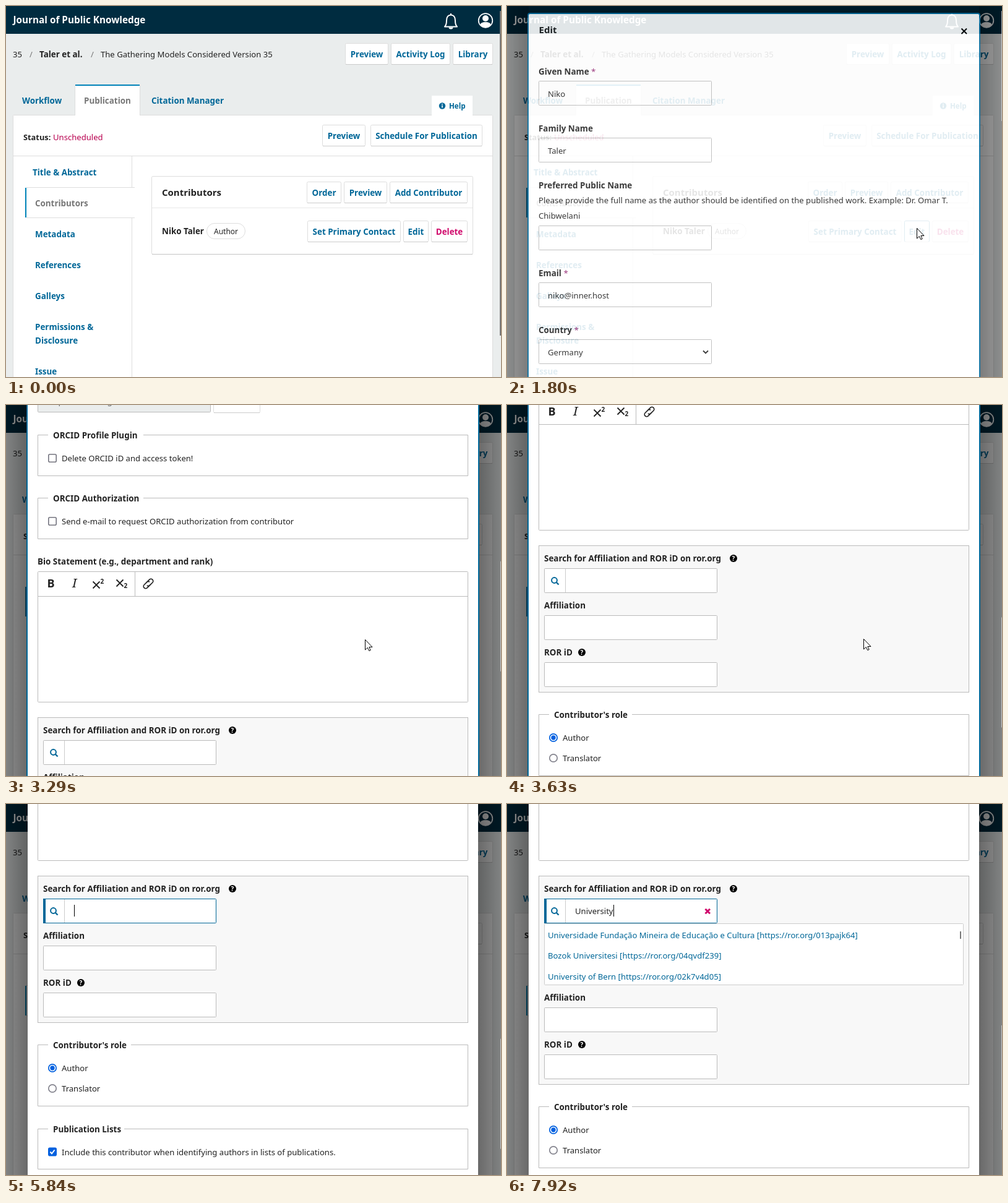
An HTML page for the animation above (8 s loop, 800 px wide and 600 px high).

```html
<!DOCTYPE html>
<html lang="en">
<head>
<meta charset="utf-8">
<title>Contributor form</title>
<style>
  html, body { margin: 0; width: 100%; height: 100%; overflow: hidden; background: #eaeded; }
  svg { display: block; width: 800px; height: 600px; }
  text { font: 13.1px "Noto Sans", sans-serif; fill: #222; white-space: pre; }
  .b { font-weight: 700; font-size: 13.4px; }
  .h { font-weight: 700; font-size: 15px; }
  .s { font-size: 12px; }
  .link { fill: #006798; }
  .mute { fill: #777; }
  .red { fill: #d00a6c; }
  .white { fill: #fff; }
  .mid { text-anchor: middle; }
  .code { font-size: 13.8px; fill: #6a6a6a; }
</style>
</head>
<body>
<svg id="stage" viewBox="0 0 800 600"></svg>
<script>
const BLUE = '#006798', LINE = '#ddd', FIELD = '#bbb';
const stage = document.getElementById('stage');

// ---- drawing helpers (text is placed by its vertical centre) ----
const text = (x, cy, str, cls = '') =>
  `<text x="${x}" y="${cy + 5}" class="${cls}">${str.replace(/&/g, '&amp;')}</text>`;
const box = (x, y, w, h, fill = '#fff', stroke = FIELD, rx = 1, extra = '') =>
  `<rect x="${x + .5}" y="${y + .5}" width="${w - 1}" height="${h - 1}" rx="${rx}" fill="${fill}" stroke="${stroke}" ${extra}/>`;
const fill = (x, y, w, h, color, extra = '') =>
  `<rect x="${x}" y="${y}" width="${w}" height="${h}" fill="${color}" ${extra}/>`;
const path = (d, stroke, width = 1, extra = '') =>
  `<path d="${d}" fill="none" stroke="${stroke}" stroke-width="${width}" ${extra}/>`;
const group = (id, content) => `<g id="${id}">${content}</g>`;

const button = (x, y, w, h, label, cls = 'link', id = '') =>
  box(x, y, w, h, '#fff', LINE, 2, id && `id="${id}"`) +
  path(`M${x + 1} ${y + h - .5}h${w - 2}`, '#ccc') +
  text(x + w / 2, y + h / 2, label, `b mid ${cls}`);

const label = (x, cy, str, required) =>
  `<text x="${x}" y="${cy + 5}" class="b">${str}${required ? '<tspan font-weight="400" fill="#91216f"> *</tspan>' : ''}</text>`;
const input = (x, y, value = '') => box(x, y, 280, 40) + text(x + 15, y + 21, value);
const field = (cy, name, required, value) => label(51, cy, name, required) + input(51, cy + 15, value);
const fieldset = (top, bottom, gapEnd, legend) =>
  path(`M68 ${top + .5}H51.5V${bottom + .5}H746.5V${top + .5}H${gapEnd}`, FIELD) + text(76, top + 1, legend, 'b');
const help = (x, cy) =>
  `<circle cx="${x}" cy="${cy}" r="6" fill="#000"/><text x="${x}" y="${cy + 3.6}" class="mid white" style="font-size:10px;font-weight:700">?</text>`;
const checkbox = (cy, str, checked) =>
  `<rect x="68.8" y="${cy - 6.2}" width="12.4" height="12.4" rx="2" fill="${checked ? '#0060df' : '#fff'}" stroke="${checked ? '#0060df' : '#74747f'}" stroke-width="1.6"/>` +
  (checked ? path(`M71.5 ${cy}l2.5 3 4.5-6`, '#fff', 2) : '') + text(90, cy, str);
const radio = (cy, str, checked) =>
  `<circle cx="75" cy="${cy}" r="6.2" fill="#fff" stroke="${checked ? '#0060df' : '#85858f'}" stroke-width="1.7"/>` +
  (checked ? `<circle cx="75" cy="${cy}" r="3.7" fill="#0060df"/>` : '') + text(90, cy, str);

// ---- page behind the dialog ----
const menu = [['Metadata', 369], ['References', 419], ['Galleys', 469], ['Permissions &', 519], ['Disclosure', 541], ['Issue', 591]];
const page =
  fill(0, 0, 800, 600, '#eaeded') + fill(0, 0, 800, 45, '#002c40') +
  '<text x="11.5" y="28" class="b white" style="font-size:15.3px">Journal of Public Knowledge</text>' +
  path('M709 33.5c3-3 3-6 3-10c0-6 3-9 7-9s7 3 7 9c0 4 0 7 3 10zM719 14.5v-2.5', '#fff', 2, 'stroke-linejoin="round"') +
  '<path d="M715.5 34.5a3.5 3 0 0 0 7 0z" fill="#fff"/>' +
  '<circle cx="775" cy="23.5" r="11.3" fill="none" stroke="#fff" stroke-width="1.7"/>' +
  '<circle cx="775" cy="20" r="5" fill="#fff"/><path d="M766.5 30c1-3 4-4 8.5-4s7.5 1 8.5 4a10.5 10.5 0 0 1-17 0z" fill="#fff"/>' +
  fill(798, 8, 2, 525, '#777', 'id="pageThumb"') +
  text(11, 78, '35') + text(38, 78, '/', 'mute') + text(54, 78, 'Taler et al.', 'b') + text(137, 78, '/', 'mute') +
  text(153, 78, 'The Gathering Models Considered Version 35') +
  button(548, 60, 70, 35, 'Preview') + button(622, 60, 96, 35, 'Activity Log') + button(722, 60, 65, 35, 'Library') +
  text(26, 153, 'Workflow', 'b link') + text(235, 153, 'Citation Manager', 'b link') +
  box(11, 176, 776, 440, '#fff', LINE) +
  fill(112, 127, 104, 51, '#fff') + path('M111.5 177V128M216.5 177V128', LINE) + fill(112, 127, 104, 2, '#0083b8') +
  text(126, 153, 'Publication', 'b mute') +
  fill(688, 145, 66, 33, '#fff') + `<circle cx="705" cy="161.5" r="5.2" fill="${BLUE}"/>` +
  path('M705 158v1.5M705 160.5v4', '#fff', 1.6) + '<text x="716" y="166" class="b link" style="font-size:11.6px">Help</text>' +
  '<text x="28" y="217" class="b" style="font-size:12.8px">Status:</text>' +
  '<text x="76" y="217" style="fill:#b8004f">Unscheduled</text>' +
  button(511, 192, 70, 35, 'Preview') + button(589, 192, 181, 35, 'Schedule For Publication') +
  path('M12 242.5H786M203.5 243V293.5M33 293.5H208M33 342.5H208M203.5 343V600', LINE) +
  fill(31, 294, 2, 48, '#0083b8') +
  text(43, 269, 'Title & Abstract', 'b link') + text(47, 319, 'Contributors', 'b mute') +
  menu.map(([name, y]) => text(47, y, name, 'b link')).join('') +
  box(235, 275, 520, 127, '#fff', LINE, 2) + path('M236 401.5H754', '#c4c4c4') + path('M236 326.5H754', '#e8e8e8') +
  text(252, 302, 'Contributors', 'h') +
  button(486, 284, 56, 35, 'Order') + button(546, 284, 70, 35, 'Preview') + button(620, 284, 126, 35, 'Add Contributor') +
  text(252, 364, 'Niko Taler', 'b') + box(324, 351, 63, 26, '#fff', LINE, 12.5) + text(355.5, 364, 'Author', 's mid') +
  button(487, 347, 151, 35, 'Set Primary Contact') + button(642, 347, 41, 35, 'Edit', 'link', 'editButton') +
  button(687, 347, 59, 35, 'Delete', 'red');

// ---- dialog, in unscrolled coordinates ----
const toolbar =
  '<text x="66.5" y="1046" style="font-size:18px;font-weight:700">B</text>' +
  '<text x="107" y="1046" style="font:italic 20px \'Noto Serif\',serif">I</text>' +
  path('M140.5 1036.5l11 11m0-11l-11 11M178.5 1033.5l11 11m0-11l-11 11', '#222', 1.8) +
  '<text x="152.5" y="1040" style="font-size:10px;font-weight:600">2</text><text x="190.5" y="1047" style="font-size:10px;font-weight:600">2</text>' +
  '<g transform="translate(230 1040) rotate(-45)" fill="none" stroke="#222" stroke-width="1.7">' +
  '<path d="M2 3.5H-6a3.5 3.5 0 0 1 0-7H0a3.5 3.5 0 0 1 3.5 3M-2-3.5H6a3.5 3.5 0 0 1 0 7H0a3.5 3.5 0 0 1-3.5-3"/></g>';

const upperForm =
  text(51.5, 39, 'Edit', 'h') + path('M734.5 36.5l8.5 8.5m0-8.5l-8.5 8.5', '#000', 2) +
  field(106, 'Given Name', true, 'Niko') + field(198, 'Family Name', false, 'Taler') +
  label(51, 290, 'Preferred Public Name') +
  text(51, 314, 'Please provide the full name as the author should be identified on the published work. Example: Dr. Omar T.') +
  text(51, 339, 'Chibwelani') + input(51, 355) +
  field(432, 'Email', true, 'niko@inner.host') + field(524, 'Country', true, 'Germany') +
  path('M317 557.5l4 4 4-4', '#222', 1.8) +
  field(616, 'Homepage URL') +
  label(51, 708, 'ORCID iD') + help(126, 708) + box(51, 723, 280, 40, '#eaeded') +
  text(66, 744, 'https://orcid.org/0000-0000-1234-5678', 'code') + button(335, 723, 76, 41, 'Override') +
  fieldset(799, 865, 222, 'ORCID Profile Plugin') + checkbox(837, 'Delete ORCID iD and access token!') +
  fieldset(901, 967, 222, 'ORCID Authorization') + checkbox(939, 'Send e-mail to request ORCID authorization from contributor') +
  label(51, 1004, 'Bio Statement (e.g., department and rank)') +
  box(51, 1020, 696, 212) + path('M52 1060.5H746M208.5 1021V1060', FIELD) + toolbar;

const searchField =
  label(60, 1277, 'Search for Affiliation and ROR iD on ror.org') + help(366, 1277) +
  box(60, 1293, 280, 40, '#fff', FIELD, 1, 'id="searchBox"') + path('M94.5 1294V1332', '#ccc') +
  `<circle cx="76.5" cy="1312.5" r="4.4" fill="none" stroke="${BLUE}" stroke-width="2"/>` + path('M79.5 1315.5l4 4', BLUE, 2.4) +
  group('focusBar', fill(60, 1293, 4, 40, BLUE)) +
  '<text id="query" x="110" y="1318"></text>' + fill(110, 1303, 1, 19, '#000', 'id="caret"') +
  group('clear', path('M320.5 1309.7l7.5 7.5m0-7.5l-7.5 7.5', '#d00a6c', 3));

const results =
  box(60, 1333, 678, 100, '#fff', '#ccc') +
  [0, 1, 2].map(i => `<text class="link" x="66" y="${1357 + Math.round(i * 33.4)}"></text>`).join('') +
  group('listBar', fill(732, 1346, 2, 12, '#777'));

const lowerForm =
  label(60, 1353, 'Affiliation') + input(60, 1369) + label(60, 1429, 'ROR iD') + help(121, 1429) + input(60, 1445) +
  fieldset(1529, 1628, 202, "Contributor's role") + radio(1567, 'Author', true) + radio(1600, 'Translator') +
  fieldset(1665, 1730, 191, 'Publication Lists') +
  checkbox(1702.5, 'Include this contributor when identifying authors in lists of publications.', true);

const shade = (id, x1, x2) =>
  `<linearGradient id="${id}" x1="${x1}" x2="${x2}"><stop stop-opacity="0"/><stop offset="1" stop-opacity=".25"/></linearGradient>`;

stage.innerHTML = shade('shadeLeft', 0, 1) + shade('shadeRight', 1, 0) + page + group('dialog',
  fill(0, 0, 800, 600, '#000', 'opacity=".45"') +
  fill(0, 0, 35, 600, 'url(#shadeLeft)') + fill(763, 0, 37, 600, 'url(#shadeRight)') +
  fill(799, 8, 1, 178, '#c8c8c8', 'id="thumb"') +
  group('scroller',
    fill(35, 13, 728, 1900, '#fff') +
    `<rect id="outline" x="34" y="12" width="730" height="1902" rx="3" fill="none" stroke="${BLUE}" stroke-width="2"/>` +
    upperForm + box(51, 1256, 696, 239, '#f8f8f8', FIELD, 0, 'id="panel"') + searchField +
    group('lower', lowerForm) + group('results', results))) +
  group('cursor', '<path d="M.5.5V17l3.8-3.6 2.5 5.2 2.4-1-2.3-5.100h5.1z" fill="#fff" stroke="#000"/>');

// ---- timeline ----
const LOOP = 8000, TICK = 10, OPEN = 1380, FOCUS = 4820, FIRST_KEY = 5950;
const scrollKeys = [[2140, 0], [2300, 110], [2600, 343], [2750, 500], [2870, 571], [3100, 571], [3290, 751], [3630, 1029], [3750, 1095], [3930, 1140]];
const cursorKeys = [[190, 701, 567], [239, 701, 567], [240, 671, 552], [590, 671, 552], [1240, 662, 359], [1950, 662, 359],
  [2250, 588, 366], [3000, 588, 366], [3290, 580, 379], [3630, 576, 378], [4150, 576, 378], [4760, 210, 176]];
const keyTimes = [FIRST_KEY, 6180, 6450, 6660, 6830, 7000, 7140, 7310, 7460, 7640];
const rows = ['Universidade Fundação Mineira de Educação e Cultura [https://ror.org/013pajk64]',
  'Bozok Universitesi [https://ror.org/04qvdf239]', 'University of Bern [https://ror.org/02k7v4d05]'];
const listChanges = [[0, []], [6750, rows], [6920, rows.slice(1)], [7220, []], [7550, rows], [7740, []], [7920, rows]];

const linear = u => u;
const smooth = u => u * u * (3 - 2 * u);
function sample(keys, t, ease) {
  const next = keys.findIndex(key => key[0] > t);
  if (next === 0) return keys[0].slice(1);
  if (next < 0) return keys[keys.length - 1].slice(1);
  const a = keys[next - 1], b = keys[next], u = ease((t - a[0]) / (b[0] - a[0]));
  return a.slice(1).map((v, i) => v + (b[i + 1] - v) * u);
}

const el = id => document.getElementById(id);
const show = (id, on) => el(id).setAttribute('visibility', on ? 'visible' : 'hidden');
const move = (id, x, y) => el(id).setAttribute('transform', `translate(${Math.round(x)} ${Math.round(y)})`);
const rowNodes = document.querySelectorAll('#results text');

function render(t) {
  const [scroll] = sample(scrollKeys, t, linear);
  const focused = t >= FOCUS, typing = t >= FIRST_KEY;

  el('editButton').setAttribute('stroke', t >= 1240 ? BLUE : LINE);
  show('pageThumb', t < OPEN);
  el('dialog').setAttribute('opacity', Math.min(1, Math.max(0, (t - OPEN) / 477)));
  move('scroller', 0, -scroll);
  el('thumb').setAttribute('y', 8 + scroll * (typing ? .307 : .326));
  el('thumb').setAttribute('height', typing ? 169 : 178);

  show('outline', !focused);
  show('focusBar', focused);
  el('searchBox').setAttribute('stroke', focused ? BLUE : FIELD);

  el('query').textContent = 'University'.slice(0, keyTimes.filter(k => k <= t).length);
  el('caret').setAttribute('x', 110 + Math.round(typing ? el('query').getComputedTextLength() : 0));
  show('caret', focused && (typing || t < 5330 || t >= 5840));
  show('clear', typing);

  const list = listChanges.filter(change => change[0] <= t).pop()[1];
  rowNodes.forEach((node, i) => { node.textContent = list[i] || ''; });
  show('results', typing);
  show('listBar', typing && list.length > 2);
  move('lower', 0, typing ? 100 : 0);
  el('panel').setAttribute('height', typing ? 337 : 237);

  show('cursor', t >= 190 && t < 4760);
  move('cursor', ...sample(cursorKeys, t, smooth));
}

function frame() {
  render(Math.floor(performance.now() % LOOP / TICK) * TICK);
  requestAnimationFrame(frame);
}
frame();
</script>
</body>
</html>
```
